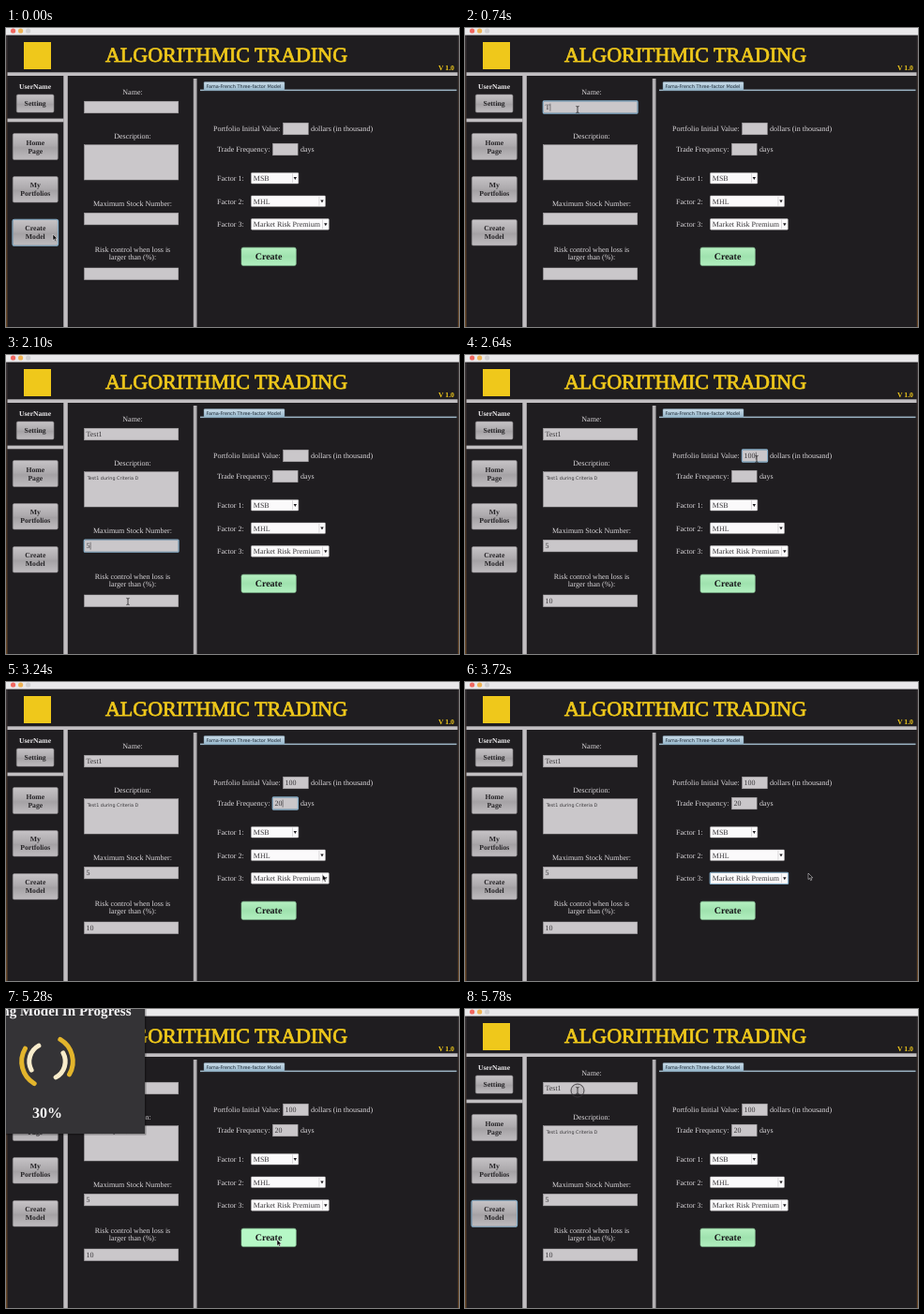
Animation, 483 px wide and 319 px high, one loop 5.8 s. Source, as an HTML page:

```html
<!DOCTYPE html>
<html lang="en">
<head>
<meta charset="utf-8">
<title>Algorithmic Trading</title>
<style>
  html, body { margin: 0; width: 100%; height: 100%; overflow: hidden; background: #201e21; }
  svg { display: block; width: 100%; height: 100%; }
  text { font-family: "Liberation Serif", "Times New Roman", serif; font-size: 8px;
         text-rendering: geometricPrecision; white-space: pre; }
  .bold { font-weight: bold; }
  .sans { font-family: "DejaVu Sans", sans-serif; font-size: 4.85px; }
</style>
</head>
<body>
<svg id="stage" viewBox="0 0 483 319">
  <defs>
    <linearGradient id="grey" x2="0" y2="1">
      <stop offset="0" stop-color="#c6c3c6"/><stop offset=".45" stop-color="#aeabae"/>
      <stop offset=".55" stop-color="#a5a2a5"/><stop offset="1" stop-color="#bfbcbf"/>
    </linearGradient>
    <linearGradient id="green" x2="0" y2="1">
      <stop offset="0" stop-color="#b4efc0"/><stop offset=".5" stop-color="#9fe2ae"/>
      <stop offset="1" stop-color="#b2f0c0"/>
    </linearGradient>
    <linearGradient id="tab" x2="0" y2="1">
      <stop offset="0" stop-color="#c9dbe7"/><stop offset="1" stop-color="#98b8cd"/>
    </linearGradient>
    <linearGradient id="desk" x2="0" y2="1">
      <stop offset="0" stop-color="#3a3438"/><stop offset=".6" stop-color="#4a3524"/>
      <stop offset="1" stop-color="#6b4a2a"/>
    </linearGradient>
  </defs>
</svg>
<script>
const LOOP = 5800;
const BLUE = "#86b0cc", INK = "#1f1d20", TYPED = "#3a383b", PALE = "#dad7da", GOLD = "#efc81b";
const stage = document.getElementById("stage");

function add(name, attrs, parent = stage) {
  const el = document.createElementNS("http://www.w3.org/2000/svg", name);
  for (const key in attrs) el.setAttribute(key, attrs[key]);
  return parent.appendChild(el);
}
const rect = (x, y, width, height, fill, more = {}, parent) =>
  add("rect", { x, y, width, height, fill, ...more }, parent);
function label(text, x, y, fill = PALE, more = {}, parent) {
  const el = add("text", { x, y, fill, ...more }, parent);
  el.textContent = text;
  return el;
}
const centred = (text, x, y, fill, more = {}, parent) =>
  label(text, x, y, fill, { "text-anchor": "middle", ...more }, parent);
const show = (el, on) => el.setAttribute("visibility", on ? "visible" : "hidden");
const ring = (x, y, w, h, r = 1) =>
  rect(x - 0.3, y - 0.3, w + 0.6, h + 0.6, "none", { rx: r, stroke: BLUE, "stroke-width": 1.1 });

// Window frame
rect(0, 0, 483, 319, "url(#desk)");
rect(1.5, 0, 480.3, 319, INK);
rect(0, 0, 483, 7.6, "#e9e8ea");
["#f0665f", "#eeb253", "#d0cfd1"].forEach((c, i) => add("circle", { cx: 7.6 + i * 8, cy: 3, r: 2.6, fill: c }));

// Header and dividers
rect(19, 15, 29, 29, GOLD);
centred("ALGORITHMIC TRADING", 235, 36, GOLD, { style: "font-size:22px", stroke: GOLD, "stroke-width": 0.8 });
label("V 1.0", 461, 45, GOLD, { class: "bold", style: "font-size:7.7px" });
rect(1.5, 47.3, 480, 3.7, "#c1bec1");
rect(61.3, 51, 4.5, 268, "#c1bec1");
rect(199.8, 54, 3.7, 265, "#b3b0b3");
rect(1.5, 96.6, 60, 3.7, "#c1bec1");

// Side menu
function menuButton(x, y, w, h, lines) {
  rect(x, y, w, h, "url(#grey)", { rx: 1.5, stroke: "#8a878a", "stroke-width": 0.6 });
  const first = y + h / 2 + 2.6 - (lines.length - 1) * 4.4;
  lines.forEach((s, i) => centred(s, x + w / 2, first + i * 8.8, "#252326", { class: "bold", style: "font-size:7.7px" }));
}
centred("UserName", 31, 64.5, "#eceaec", { class: "bold", style: "font-size:7.6px" });
menuButton(11.3, 71, 39.7, 19, ["Setting"]);
menuButton(7.3, 112.5, 48, 28, ["Home", "Page"]);
menuButton(7.3, 158.5, 48, 27.5, ["My", "Portfolios"]);
menuButton(7.3, 204.5, 48, 27.5, ["Create", "Model"]);

// Left form
[["Name:", 71], ["Description:", 117.5], ["Maximum Stock Number:", 189.5],
 ["Risk control when loss is", 238.5], ["larger than (%):", 247]]
  .forEach(([s, y]) => centred(s, 135, y));

// Right form
rect(207, 65.6, 273.5, 1.5, "#9db6c6");
rect(211, 57.6, 86, 8.8, "url(#tab)", { rx: 1, stroke: "#6d8ba0", "stroke-width": 0.4 });
label("Fama-French Three-factor Model", 213.5, 63.9, "#1d2a36", { class: "sans", style: "font-size:4.95px" });
label("Portfolio Initial Value:", 221, 110.4);
label("dollars (in thousand)", 325, 110.4);
label("Trade Frequency:", 225, 132.2);
label("days", 314, 132.2);

function combo(title, value, y, w) {
  label(title, 225, y + 8.6);
  rect(261.5, y, w, 11.6, "#fbfafb", { rx: 0.8, stroke: "#b5b2b5", "stroke-width": 0.5 });
  label(value, 263.8, y + 8.6, TYPED);
  const x = 261.5 + w - 5.2;
  rect(x - 1.6, y + 1, 0.5, 9.6, "#b9b6b9");
  add("path", { d: `M${x} ${y + 4.6}h3.4l-1.7 3z`, fill: INK });
}
combo("Factor 1:", "MSB", 154.4, 50.3);
combo("Factor 2:", "MHL", 179, 79);
combo("Factor 3:", "Market Risk Premium", 203.6, 82.8);

// Fields: focus span, then the typing span of the text
const fields = [
  { box: [83.5, 78.2, 100.3, 12.6], text: "Test1", focus: [620, 1110], type: [700, 960] },
  { box: [83.5, 124.7, 100.3, 37.3], text: "Test1 during Criteria D", focus: [1110, 1800], type: [1120, 1570], area: true },
  { box: [83.5, 197.3, 100.3, 12.6], text: "5", focus: [1800, 2110], type: [1840, 1870] },
  { box: [83.5, 256, 100.3, 12.6], text: "10", focus: [2110, 2460], type: [2150, 2250] },
  { box: [295.6, 101.2, 26.7, 12.6], text: "100", focus: [2460, 2860], type: [2500, 2620] },
  { box: [284.5, 123.2, 26.6, 12.6], text: "20", focus: [2860, 3290], type: [2900, 2990] }
];
for (const f of fields) {
  const [x, y, w, h] = f.box;
  rect(x, y, w, h, "#cac7ca", { stroke: "#a9a6a9", "stroke-width": 0.5 });
  f.ring = ring(x, y, w, h);
  f.out = f.area
    ? label("", x + 3.2, y + 8.1, TYPED, { class: "sans" })
    : label("", x + 1.9, y + 8.9, TYPED);
  f.caret = rect(0, f.area ? y + 3.4 : y + 2.4, 0.5, f.area ? 6 : 8, INK);
}

// Create button
const createRing = rect(250.2, 233.4, 59.9, 21, "none", { rx: 2.5, stroke: "#8fb0b0", "stroke-width": 0.8 });
const createFace = rect(251, 234.2, 58.3, 19.4, "url(#green)", { rx: 2, stroke: "#86c495", "stroke-width": 0.6 });
centred("Create", 280, 247.3, "#171619", { class: "bold", style: "font-size:10px" });
const menuRing = ring(7.3, 204.5, 48, 27.5, 2);
const comboRing = ring(261.5, 203.6, 82.8, 11.6);

// Pointers
const arrow = add("path", {
  d: "M0 0V6.6L1.5 5.2 2.6 7.7 3.7 7.2 2.7 4.8H4.7Z", fill: "#0b0a0c", stroke: "#f4f3f4", "stroke-width": 0.5
});
const beam = add("g", {});
add("path", {
  d: "M-1.6-3.6Q0-3.6 0-2.6Q0-3.6 1.6-3.6M0-2.8V2.8M-1.6 3.6Q0 3.6 0 2.6Q0 3.6 1.6 3.6",
  fill: "none", stroke: "#242225", "stroke-width": 0.8
}, beam);
const halo = add("circle", { r: 7, fill: "#000", "fill-opacity": 0.06, stroke: "#39363a", "stroke-width": 0.9 }, beam);

// Progress window
const popup = add("g", {});
rect(0, 0, 149.5, 134.5, "#000", { opacity: 0.3 }, popup);
rect(0, 0, 148, 133, "#343336", {}, popup);
centred("Creating Model In Progress", 44, 7, "#f5f4f5", { class: "bold", style: "font-size:15.1px" }, popup);
const percent = centred("", 44, 116, "#f5f4f5", { class: "bold", style: "font-size:16px" }, popup);

function arcs(r, from, to, stroke, width) {
  const g = add("g", {}, popup);
  const at = a => `${r * Math.cos(a * Math.PI / 180)} ${r * Math.sin(a * Math.PI / 180)}`;
  for (const turn of [0, 180])
    add("path", {
      d: `M${at(from + turn)}A${r} ${r} 0 0 1 ${at(to + turn)}`,
      fill: "none", stroke, "stroke-width": width, "stroke-linecap": "round"
    }, g);
  return g;
}
const outer = arcs(27.3, -60, 30, "#e3b52c", 5);
const inner = arcs(19.2, -28, 62, "#f8eccb", 5);

// Pointer path: time, x, y
const path = [
  [0, 50, 220], [250, 50, 220], [600, 120, 87], [960, 120, 87], [1100, 144, 131],
  [1620, 144, 131], [1790, 130, 204], [1930, 130, 204], [2090, 130, 263], [2290, 130, 263],
  [2450, 311, 111], [2700, 311, 111], [2840, 302, 130], [3040, 302, 130], [3270, 339, 209],
  [3380, 339, 209], [3600, 366, 204], [3850, 366, 204], [4250, 289, 246], [5560, 289, 246],
  [5650, 50, 220], [5690, 50, 220], [5760, 120, 87], [LOOP, 120, 87]
];
const progress = [[4960, 0], [5060, 10], [5160, 20], [5250, 30], [5320, 50], [5390, 70], [5460, 90], [5510, 100]];

const within = (t, a, b) => t >= a && t < b;
const ease = k => k * k * (3 - 2 * k);

function pointerAt(t) {
  const i = path.findIndex(p => p[0] > t);
  const [t0, x0, y0] = path[i - 1], [t1, x1, y1] = path[i];
  const k = ease((t - t0) / (t1 - t0));
  return [x0 + (x1 - x0) * k, y0 + (y1 - y0) * k];
}

function drawField(f, t) {
  const [a, b] = f.type;
  const n = f.text.length;
  const count = Math.max(0, Math.min(n, Math.floor((t - a) / (b - a) * n) + (t >= a ? 1 : 0)));
  const typed = f.text.slice(0, count);
  if (f.out.textContent !== typed) f.out.textContent = typed;
  const focused = within(t, ...f.focus);
  show(f.ring, focused);
  show(f.caret, focused);
  if (focused) f.caret.setAttribute("x", +f.out.getAttribute("x") + f.out.getComputedTextLength() + 0.4);
}

function draw(t) {
  fields.forEach(f => drawField(f, t));
  show(menuRing, t < 620 || t >= 5670);
  show(comboRing, within(t, 3290, 4340));

  const pressed = within(t, 4340, 4700);
  const hover = within(t, 4200, 5580);
  show(createRing, within(t, 4340, 4960));
  createFace.setAttribute("fill", pressed ? "#84cb98" : hover ? "#b6f8c6" : "url(#green)");

  const [x, y] = pointerAt(t);
  const overField = fields.some(({ box: [l, top, w, h] }) => x > l && x < l + w && y > top && y < top + h);
  arrow.setAttribute("transform", `translate(${x} ${y})`);
  beam.setAttribute("transform", `translate(${x} ${y})`);
  show(arrow, !overField);
  show(beam, overField);
  show(halo, overField && t >= 5740);

  const open = within(t, 4960, 5560);
  popup.setAttribute("display", open ? "inline" : "none");
  if (open) {
    percent.textContent = progress.filter(p => p[0] <= t).pop()[1] + "%";
    const turn = (t - 5280) * 0.36;
    outer.setAttribute("transform", `translate(44 56) rotate(${turn})`);
    inner.setAttribute("transform", `translate(44 56) rotate(${-turn})`);
  }
}

const start = performance.now();
function tick() {
  draw((performance.now() - start) % LOOP);
  requestAnimationFrame(tick);
}
draw(0);
requestAnimationFrame(tick);
</script>
</body>
</html>
```
